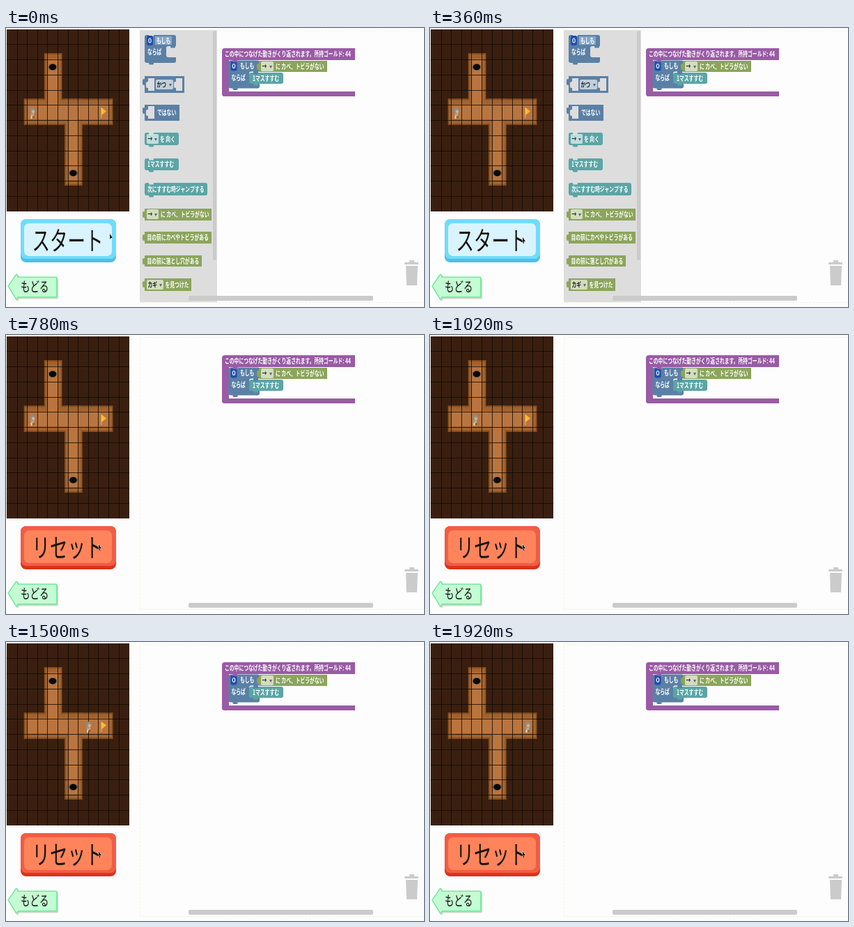
An HTML page with a canvas that plays this animation: 600 by 400 pixels, repeating every 1.98 s.

```html
<!DOCTYPE html>
<html lang="ja">
<head>
<meta charset="utf-8">
<style>
html, body { margin: 0; width: 100%; height: 100%; overflow: hidden; background: #fdfdfd; }
canvas { display: block; }
</style>
</head>
<body>
<canvas id="stage" width="600" height="400"></canvas>
<script>
const ctx = document.getElementById('stage').getContext('2d');
const LOOP = 1980, STEP = 60, CLICK = 780, ARRIVE = 1690;
const ASPECT = 1.45;
const CELL_W = 14.6, CELL_H = 21.75, MAP_X = 2, MAP_Y = 2.5;
const PAPER = '#fdfdfd', SHELF = '#dddddd', BAR = '#cbcbcb', FIELD = 'rgba(255, 255, 255, .62)';
const LOGIC = '#5b80a5', MOVE = '#5ba5a5', SENSE = '#8ba55b', REPEAT = '#995ba5';

function box(x, y, w, h, color, r = 0) {
  ctx.fillStyle = color;
  ctx.beginPath();
  ctx.roundRect(x, y, w, h, r);
  ctx.fill();
}

function oval(x, y, rx, ry, color) {
  ctx.fillStyle = color;
  ctx.beginPath();
  ctx.ellipse(x, y, rx, ry, 0, 0, 7);
  ctx.fill();
}

function shape(points, color, stroke, width = 1) {
  ctx.beginPath();
  points.forEach(([x, y]) => ctx.lineTo(x, y));
  ctx.closePath();
  ctx.lineJoin = 'round';
  if (stroke) {
    ctx.strokeStyle = stroke;
    ctx.lineWidth = width;
    ctx.stroke();
  }
  ctx.fillStyle = color;
  ctx.fill();
}

function text(str, x, y, color = '#fff', size = 6.8, weight = 'bold') {
  ctx.save();
  ctx.translate(x, y);
  ctx.scale(1, ASPECT);
  ctx.font = `${weight} ${size}px "Noto Sans CJK JP", "Noto Sans CJK", sans-serif`;
  ctx.textBaseline = 'middle';
  ctx.fillStyle = color;
  ctx.fillText(str, 0, 0);
  ctx.restore();
}

function dropdown(str, x, y, w) {
  box(x, y - 7, w, 14, FIELD, 2);
  text(str, x + 1.5, y, '#222');
  shape([[x + w - 6, y - 1], [x + w - 2, y - 1], [x + w - 4, y + 3]], '#666');
}

// Command block with a notch in its top edge
function command(x, y, w, h, back, str, textX = x + 4) {
  box(x, y, w, h, MOVE, 3);
  box(x + 6, y - 1, 7, 3.5, back, 1.5);
  box(x + 6, y + h - 1, 7, 3.5, MOVE, 1.5);
  text(str, textX, y + h / 2);
}

// Value block with a plug on its left edge
function value(x, y, w, h, color) {
  box(x, y, w, h, color);
  box(x - 3, y + 4, 4, 9, color, 2);
}

function socket(x, y) {
  box(x, y - 9, 9, 18, SHELF);
  box(x - 3, y - 4, 4, 9, SHELF, 2);
}

function ifBlock(x, y, right, mouth, back) {
  const w = right - x;
  box(x, y, w, 40, LOGIC, 3);
  box(mouth, y + 16, right - mouth + 2, 16, back, [3, 0, 0, 3]);
  box(mouth + 6, y + 15, 7, 3.5, LOGIC, 1.5);
  box(x + 6, y - 1, 7, 3.5, back, 1.5);
  box(x + 6, y + 39, 7, 3.5, LOGIC, 1.5);
  box(x + 3, y + 1, 9, 14, '#1f4fae', 2);
  ctx.strokeStyle = '#e6eefc';
  ctx.lineWidth = 1.2;
  ctx.beginPath();
  ctx.ellipse(x + 7.5, y + 8, 1.7, 3, 0, 0, 7);
  ctx.stroke();
  text('もしも', x + 16.5, y + 8);
  text('ならば', x + 4, y + 24.5);
}

function shelf() {
  box(192, 3, 111, 390, SHELF);
  ifBlock(199, 10, 244, 230, SHELF);
  box(214, 12, 24, 12, '#86a6c8');
  text('もしも', 216, 18);

  value(199, 69, 57, 24, LOGIC);
  socket(204, 81);
  socket(244, 81);
  dropdown('かつ', 215, 81, 25);

  value(199, 110, 50, 23, LOGIC);
  socket(204, 121);
  text('ではない', 217, 121);

  command(199, 150, 49, 18, SHELF, 'を 向く', 221);
  dropdown('→', 202, 159, 17);
  command(199, 187, 49, 17, SHELF, '1マスすすむ');
  command(199, 222, 90, 18, SHELF, '次にすすむ時ジャンプする');

  value(199, 259, 96, 17, SENSE);
  dropdown('→', 202, 267, 17);
  text('に カベ、トビラがない', 222, 267);
  value(199, 292, 96, 17, SENSE);
  text('目の前にカベやトビラがある', 202.5, 300.5);
  value(199, 326, 82, 16, SENSE);
  text('目の前に落とし穴がある', 202.5, 334);
  value(199, 359, 67, 18, SENSE);
  dropdown('カギ', 202, 368, 24);
  text('を見つけた', 228.5, 368);
  box(297, 4, 5, 329, BAR, 2);
}

function workspace(running) {
  ctx.setLineDash([3, 2]);
  ctx.strokeStyle = '#f1f1e2';
  ctx.lineWidth = 1;
  ctx.strokeRect(192.5, 3.5, 420, 390);
  ctx.setLineDash([]);

  box(310, 29, 191, 17, REPEAT, [4, 0, 0, 0]);
  box(310, 40, 10, 58, REPEAT, [0, 0, 0, 4]);
  box(310, 91, 191, 7, REPEAT, [0, 0, 0, 4]);
  text('この中につなげた動きがくり返されます。所持ゴールド: 44', 314, 37);
  ifBlock(319.5, 46.5, 364, 349, PAPER);
  box(325.5, 45, 7, 4, REPEAT, 1.5);
  value(363, 47, 98, 16, SENSE);
  dropdown('→', 366, 55, 18);
  text('に カベ、トビラがない', 387, 55);
  command(349, 64, 49, 16, LOGIC, '1マスすすむ', 354);

  if (!running) shelf();
  box(262, 384, 265, 7, BAR, 2);

  // Trash can
  box(572, 336, 20, 3, BAR, 1);
  box(579, 333, 7, 3, BAR, 1);
  shape([[574, 341], [591, 341], [590, 369], [575, 369]], BAR);
}

// Corridors as [column, row, columns, rows]
const CORRIDORS = [[2, 5, 8, 1], [4, 2, 1, 4], [6, 5, 1, 5]];

function corridors(padX, padY, color) {
  for (const [c, r, w, h] of CORRIDORS)
    box(MAP_X + c * CELL_W - padX, MAP_Y - 2 + r * CELL_H - padY,
      w * CELL_W + 2 * padX, h * CELL_H + 2 * padY, color);
}

function hole(x, y) {
  oval(x, y, 6.2, 5, '#6f5a48');
  oval(x, y, 5.2, 4.2, '#050505');
}

function hero(x) {
  box(x - 2.5, 119, 5, 8, '#b9a48c', 2);
  box(x - 2.5, 126, 2, 4, '#d8d5c4');
  box(x + 0.5, 126, 2, 3, '#557048');
  oval(x, 118.5, 4, 4.5, '#908a84');
  oval(x + 1, 120, 2.2, 2.4, '#d0b090');
}

function maze(t) {
  box(1, 2, 176, 261, '#3a1f10');
  corridors(5.5, 8, '#85501f');
  corridors(4, 6, '#a1622f');
  corridors(0, 0, '#b97540');
  hole(67, 56);
  hole(96.5, 208);
  ctx.strokeStyle = 'rgba(15, 8, 0, .8)';
  ctx.lineWidth = 1;
  ctx.beginPath();
  for (let i = 1; i < 12; i++) {
    const x = Math.round(MAP_X + i * CELL_W) - .5, y = Math.round(MAP_Y + i * CELL_H) - .5;
    ctx.moveTo(x, 2);
    ctx.lineTo(x, 263);
    ctx.moveTo(1, y);
    ctx.lineTo(177, y);
  }
  ctx.stroke();

  if (t < ARRIVE) {
    box(136, 114, 1.5, 15, '#d8a04a');
    shape([[137, 114], [144, 119.5], [137, 125]], '#ffb932');
  }
  const walk = Math.min(1, Math.max(0, (t - CLICK) / (ARRIVE - CLICK)));
  hero(38 + 102 * walk);
}

function buttons(running) {
  const [edge, rim, face] = running
    ? ['#de3219', '#f25c45', '#ff845c']
    : ['#4cc0e8', '#70dcfc', '#d9f4ff'];
  box(21, 274, 137, 62, edge, 8);
  box(21, 274, 137, 57, rim, 8);
  box(26, 280, 126, 47, face, 7);
  text(running ? 'リセット' : 'スタート', 37.5, 304.5, '#16120e', 25.5, 'normal');

  const arrow = [[4, 370], [15, 354], [17, 358], [72, 358], [72, 385], [17, 385], [15, 388]];
  shape(arrow.map(([x, y]) => [x + 1.5, y + 2]), '#cfd8cc', '#cfd8cc', 3);
  shape(arrow, '#c4fcd4', '#72e898', 3);
  text('もどる', 21, 371, '#16120e', 13.5, 'normal');
}

function cursor(t) {
  const k = Math.min(1, t / 300);
  const x = 149 - 16 * k, y = 295 + 5 * k;
  shape([[x, y], [x, y + 8], [x + 1.5, y + 6], [x + 4, y + 6]], '#111', '#fff');
}

function draw() {
  const t = Math.floor(performance.now() % LOOP / STEP) * STEP;
  const running = t >= CLICK;
  box(0, 0, 600, 400, PAPER);
  maze(t);
  buttons(running);
  workspace(running);
  cursor(t);
  requestAnimationFrame(draw);
}
draw();
</script>
</body>
</html>
```
